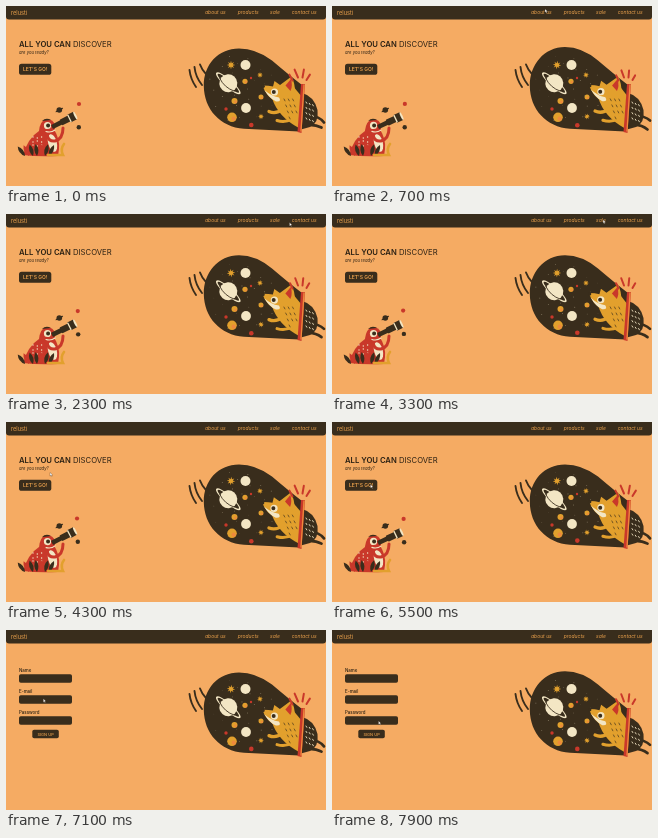
Recreate the animation shown at these times as an HTML page with a canvas. Size 320 px wide and 180 px high, loop 8 s.

```html
<!DOCTYPE html>
<html lang="en">
<head>
<meta charset="utf-8">
<title>relusti</title>
<style>
html, body { margin: 0; width: 100%; height: 100%; overflow: hidden; background: #f5ab63; }
canvas, svg { position: absolute; left: 0; top: 0; width: 320px; height: 180px; }
text { font-family: Inter, "Open Sans", sans-serif; fill: #2a2013; }
.nav text, .gold { fill: #e9a04c; }
.nav text { font-size: 5px; font-style: italic; }
.label text { font-size: 4.4px; font-weight: 500; }
</style>
</head>
<body>
<canvas id="art"></canvas>
<svg viewBox="0 0 320 180">
  <g class="nav">
    <text x="5" y="8.7" style="font-size:5.6px;font-style:normal">relusti</text>
    <text x="199" y="8.4">about us</text>
    <text x="231.7" y="8.4">products</text>
    <text x="264" y="8.4">sale</text>
    <text x="285.7" y="8.4">contact us</text>
  </g>
  <g id="home">
    <text x="13" y="40.8" font-size="7.7"><tspan font-weight="600">ALL YOU CAN</tspan> DISCOVER</text>
    <text x="13" y="48.2" font-size="4.2" font-style="italic">are you ready?</text>
    <text class="gold" x="29.2" y="65.2" font-size="5" font-weight="600" text-anchor="middle">LET'S GO!</text>
  </g>
  <g id="form" class="label">
    <text x="13" y="42">Name</text>
    <text x="13" y="62.8">E-mail</text>
    <text x="13" y="83.7">Password</text>
    <text class="gold" x="39.6" y="105.6" style="font-size:4px" text-anchor="middle">SIGN UP</text>
  </g>
  <path id="pointer" d="M0 0 L0 3.6 L.9 2.8 L1.6 4 L2.1 3.7 L1.5 2.5 L2.6 2.4 Z" fill="#fff" stroke="#3a2e1c" stroke-width=".3"/>
</svg>
<script>
const LOOP = 8000, SWITCH = 5850, TAU = Math.PI * 2;
const DARK = '#392d1c', CREAM = '#f3e6c4', RED = '#c9382a', GOLD = '#e2a02d', ORANGE = '#ee8a3c';
const canvas = document.getElementById('art'), ctx = canvas.getContext('2d');
const home = document.getElementById('home'), form = document.getElementById('form');
const pointer = document.getElementById('pointer');
const scale = Math.max(1, window.devicePixelRatio || 1);
canvas.width = 320 * scale;
canvas.height = 180 * scale;

// time, x, y
const route = [
  [0, 206, -5], [700, 213, 3], [1500, 240, 5], [2300, 283.5, 8.5], [3000, 298, 5],
  [3700, 230, 7], [4300, 44, 50.5], [5500, 38.5, 62.5], [6300, 39.5, 58.5],
  [7000, 37, 68], [7900, 46.5, 91], [8000, 46.5, 91]
];

const wave = (t, period, phase = 0) => Math.sin(TAU * (t / period + phase));

function fill(d, color) {
  ctx.fillStyle = color;
  ctx.fill(new Path2D(d));
}

function line(d, color, width) {
  ctx.strokeStyle = color;
  ctx.lineWidth = width;
  ctx.lineCap = 'round';
  ctx.stroke(new Path2D(d));
}

function oval(x, y, rx, color, ry = rx, angle = 0) {
  ctx.fillStyle = color;
  ctx.beginPath();
  ctx.ellipse(x, y, rx, ry, angle, 0, TAU);
  ctx.fill();
}

function box(x, y, w, h, r) {
  ctx.fillStyle = DARK;
  ctx.beginPath();
  ctx.roundRect(x, y, w, h, r);
  ctx.fill();
}

function turned(x, y, angle, draw) {
  ctx.save();
  ctx.translate(x, y);
  ctx.rotate(angle);
  draw();
  ctx.restore();
}

function star(x, y, r, color, angle = 0) {
  turned(x, y, angle, () => {
    ctx.fillStyle = color;
    ctx.beginPath();
    for (let i = 0; i < 16; i++) {
      const a = i * TAU / 16, q = i % 2 ? r * 0.45 : r;
      ctx.lineTo(q * Math.cos(a), q * Math.sin(a));
    }
    ctx.fill();
  });
}

function ball(x, y, r, color, shade) {
  oval(x, y, r, color);
  oval(x + r * 0.35, y + r * 0.3, r * 0.45, shade);
}

function sky(t) {
  const top = 41.8 + 0.8 * Math.cos(TAU * t / 1400);
  line('M183.5 64 Q184.5 73 190 81', DARK, 1.9);
  line('M188.5 61 Q189.5 71 196 79', DARK, 1.9);
  line('M194 58.5 Q196 64 200 68', DARK, 1.9);
  fill(`M233 ${top} C212 ${top} 197.5 59 197.8 80 C198 103 214 121 238 122.8 L293 125.5 L296 79 Q283 69 266 54.5 Q250 ${top} 233 ${top}Z`, DARK);
  for (let i = 0; i < 30; i++) {
    const a = i * 2.4, d = 6.4 * Math.sqrt(i + 1);
    ctx.globalAlpha = 0.55 + 0.35 * wave(t, 1600, i * 0.37);
    oval(235 + d * Math.cos(a), 83 + d * Math.sin(a), 0.38, CREAM);
  }
  ctx.globalAlpha = 1;
  turned(222.3, 77.3, 0.72, () => {
    oval(0, 0, 16, CREAM, 4);
    oval(0, 0, 14, DARK, 2.8);
    oval(0, 0, 9, CREAM);
    line('M-9.5 2 Q0 6 9.5 2', DARK, 0.8);
  });
  star(225, 59, 4.2, GOLD, wave(t, 3200) * 0.15);
  star(254, 69, 3, GOLD, -wave(t, 3200) * 0.15);
  star(255, 110.5, 3, GOLD, wave(t, 2800) * 0.15);
  oval(239.5, 59, 5, CREAM);
  oval(240, 102, 4.9, CREAM);
  ball(226, 111.3, 4.8, GOLD, ORANGE);
  ball(228.5, 95, 3, GOLD, ORANGE);
  ball(239, 75.3, 2.6, GOLD, ORANGE);
  ball(255, 91, 2.5, GOLD, ORANGE);
  oval(245, 72, 1.2, RED);
  oval(220, 103, 1.7, RED);
  oval(245.3, 119 + wave(t, 2000) * 0.4, 2.3, RED);
}

function fox(t) {
  const sway = wave(t, 2400) * 0.02, kick = Math.cos(TAU * t / 1400);
  line(`M304 110 Q313 110 318 ${115.5 + kick}`, DARK, 2.7);
  line(`M300 119 Q309 118 315.5 ${122.5 - kick}`, DARK, 2.7);
  fill('M296 87 Q308 90 311.5 104 Q313 117 304 121 L293 124Z', DARK);
  for (let i = 0; i < 12; i++) {
    const x = 300 + i % 3 * 3.3, y = 96 + Math.floor(i / 3) * 5.3 + i % 3 * 1.3;
    line(`M${x} ${y} l.8 1.3`, CREAM, 0.9);
  }
  turned(285, 108, sway, () => {
    ctx.translate(-285, -108);
    fill('M266 92 Q272 111 293 122 L296 91 L287 80Z', GOLD);
    fill('M256.5 79.5 Q263 79.5 267 80.5 L268.5 75 L274 79 L285.5 70.5 Q289 77 289 86 Q282 96 272 97 Q260 91 256.5 79.5Z', GOLD);
    fill('M279.5 79.5 L285 73 Q287 80 284.5 85Z', RED);
    fill('M258.5 84 Q265 90 273 91.5 Q276 96 270 95.5 Q263 92 258.5 84Z', CREAM);
    oval(257.3, 80.3, 1.6, DARK);
    oval(268.5, 86, 3.6, CREAM);
    oval(267.8, 86, 2, DARK);
    line('M277 103 Q270 108.5 263 105.5', GOLD, 3.3);
    line('M286 113 Q279 117 271 114.5', GOLD, 3);
    for (let i = 0; i < 10; i++) {
      const row = Math.floor(i / 3), x = 278 + i % 3 * 4.3 + row * 1.7, y = 93 + row * 6;
      line(`M${x} ${y} l1 1.9`, DARK, 0.65);
    }
  });
  fill('M295 78 L299 78 L295.5 127 L291.5 126Z', RED);
  line('M298 79 L295 125', ORANGE, 1.3);
  const ray = Math.cos(TAU * t / 1400) * 0.4;
  line(`M286.5 74.5 L${283.8 - ray} ${69 - ray}`, RED, 2);
  line(`M292 71.5 L${289 - ray} ${64 - ray}`, RED, 2);
  line(`M296.5 71.5 L${297.5 + ray} ${64 - ray}`, RED, 2);
  line(`M300.5 74 L${303.5 + ray} ${69 - ray}`, RED, 2);
}

function leaf(x, y, angle, color) {
  turned(x, y, angle, () => fill('M0 0 Q-4 -6 0 -12 Q4 -6 0 0Z', color));
}

function frog(t) {
  const nod = wave(t, 2400) * 0.02;
  fill('M17 149 Q22 132 33 125 L47 122 Q54 132 53 143 L52 150 Q32 151 17 149Z', RED);
  oval(46.5, 137, 4.3, CREAM, 9, -0.25);
  for (let i = 0; i < 9; i++) oval(27 + i % 3 * 4.3, 131 + Math.floor(i / 3) * 4 + i % 2, 0.7, CREAM);
  for (let i = 0; i < 7; i++) leaf(19 + i * 4, 150, -0.65 + i * 0.18, i % 3 === 1 ? RED : DARK);
  line('M42 149 L57 149 Q54 143 58 138', GOLD, 2.6);
  line('M41 128 Q42 136 49 135 Q57 133 57 122', RED, 3);
  turned(43, 121, nod, () => {
    fill('M-10 4 Q-9 -6 -3 -8 Q5 -8 6 -1 Q7 6 0 7 Q-7 8 -10 4Z', RED);
    fill('M-7 -6 Q-3 -10 2 -7Z', DARK);
    line('M-3 4.5 Q2 6 6 3', CREAM, 1.2);
    oval(-1.5, -1.5, 3.6, CREAM);
    oval(-0.9, -1.5, 2, DARK);
    turned(3, 0, -0.46, () => {
      box(0, -2.3, 11, 4.6, 0.7);
      box(10, -3.2, 10, 6.4, 0.7);
      box(19, -4.3, 7, 8.6, 0.7);
      ctx.fillStyle = CREAM;
      ctx.fillRect(18.8, -4, 1.3, 8);
      oval(26, 0, 1, CREAM, 4.2);
    });
  });
  const drift = (1 - Math.cos(TAU * t / LOOP)) / 2;
  oval(53.3, 104, 2.8, DARK);
  oval(53.3, 104, 4.3, DARK, 0.9, -0.5);
  oval(73 - drift * 2, 98 - drift * 1.5, 2.1, RED);
  oval(72.8 - drift, 121.3 - drift * 1.5, 2.2, DARK);
}

function movePointer(t) {
  const i = Math.max(1, route.findIndex(p => p[0] > t));
  const [t0, x0, y0] = route[i - 1], [t1, x1, y1] = route[i];
  const k = (t - t0) / (t1 - t0), e = k * k * (3 - 2 * k);
  pointer.setAttribute('transform', `translate(${x0 + (x1 - x0) * e} ${y0 + (y1 - y0) * e})`);
}

function draw(t) {
  const signing = t >= SWITCH;
  ctx.setTransform(scale, 0, 0, scale, 0, 0);
  ctx.fillStyle = '#f5ab63';
  ctx.fillRect(0, 0, 320, 180);
  box(0, -5, 320, 18.5, 3);
  sky(t);
  fox(t);
  if (signing) {
    for (const y of [44.3, 65.3, 86.2]) box(13, y, 53, 8.5, 1.8);
    box(26.3, 99.8, 26.5, 8.4, 1.8);
  } else {
    frog(t);
    box(13, 57.8, 32.3, 11, 2.6);
  }
  home.style.display = signing ? 'none' : '';
  form.style.display = signing ? '' : 'none';
  movePointer(t);
}

const start = performance.now();
function tick(now) {
  draw(Math.max(0, now - start) % LOOP);
  requestAnimationFrame(tick);
}
draw(0);
requestAnimationFrame(tick);
</script>
</body>
</html>
```
